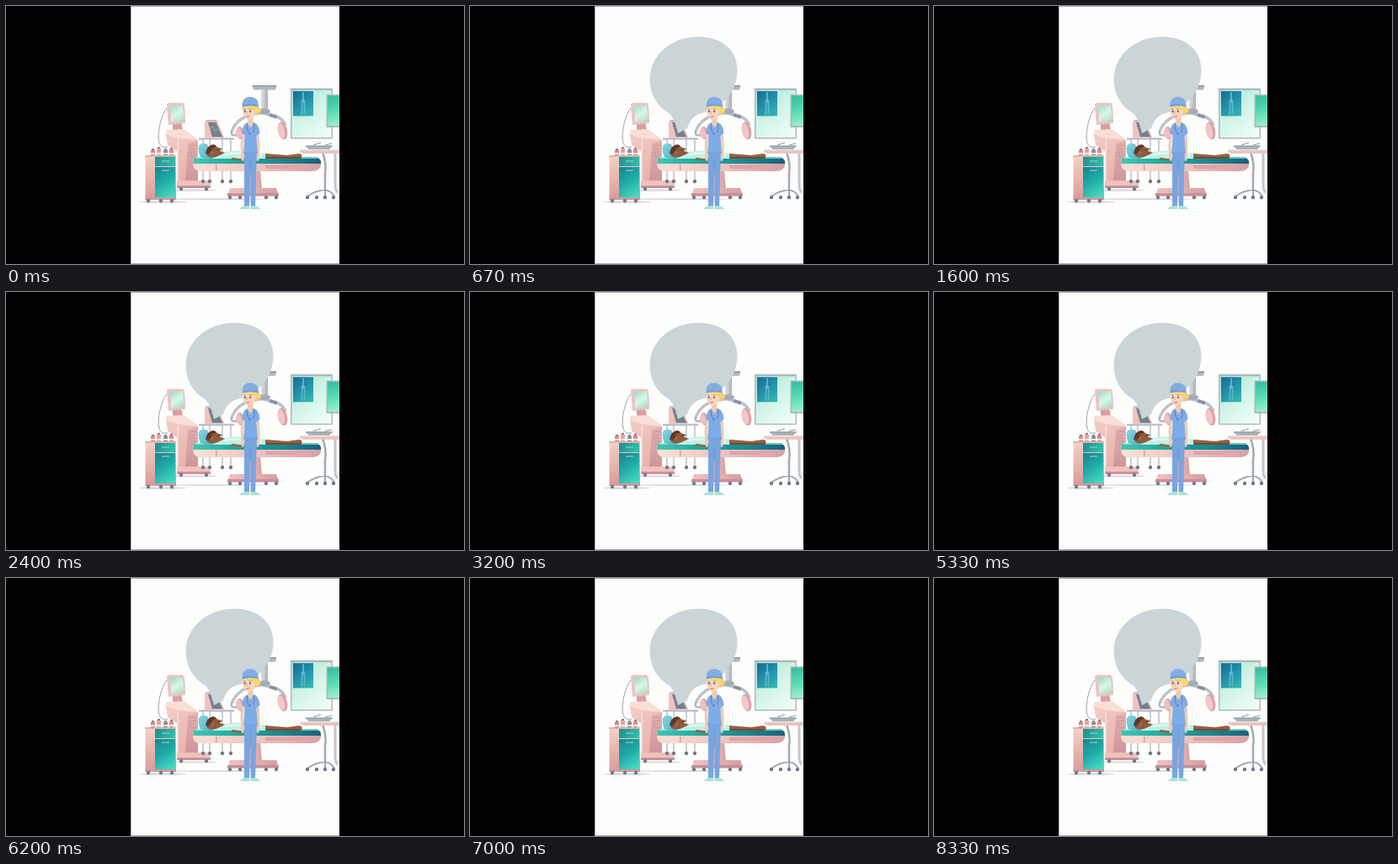
Write an HTML page with a canvas that moves like this. It is 544 by 306 pixels and loops after 8.39 s.

```html
<!DOCTYPE html>
<html lang="en">
<head>
<meta charset="utf-8">
<title>Operating room</title>
<style>
html, body { margin: 0; width: 100%; height: 100%; overflow: hidden; background: #000; }
canvas { display: block; width: 544px; height: 306px; }
</style>
</head>
<body>
<canvas id="stage" width="544" height="306"></canvas>
<script>
const ctx = document.getElementById("stage").getContext("2d");
const LOOP = 8390;
const STEP = 66.6;
const PINK = "#f0c2bc", ROSE = "#d9a0a2", BLUSH = "#f8ded6";
const GREY = "#b0b7bf", DARK = "#717b87", SKIN = "#f3c9ae", BLUE = "#80ace5";

function rect(x, y, w, h, fill) {
  ctx.fillStyle = fill;
  ctx.fillRect(x, y, w, h);
}
function shape(d, fill) {
  ctx.fillStyle = fill;
  ctx.fill(new Path2D(d));
}
function line(d, color, width = 1) {
  ctx.strokeStyle = color;
  ctx.lineWidth = width;
  ctx.stroke(new Path2D(d));
}
function oval(x, y, rx, ry, fill, angle = 0) {
  ctx.fillStyle = fill;
  ctx.beginPath();
  ctx.ellipse(x, y, rx, ry, angle, 0, Math.PI * 2);
  ctx.fill();
}
function blend(x0, y0, x1, y1, ...colors) {
  const g = ctx.createLinearGradient(x0, y0, x1, y1);
  colors.forEach((c, i) => g.addColorStop(i / (colors.length - 1), c));
  return g;
}
function wheels(y, ...xs) {
  for (const x of xs) oval(x, y, 2.2, 2.3, DARK);
}

function drawLamp() {
  shape("M292.5 94H321.5L320 99.5H294Z", GREY);
  rect(293, 94, 28, 1.4, "#8e969f");
  rect(303, 99, 8, 24, blend(303, 0, 311, 0, "#dde1e5", "#a9b0b9"));
  line("M303 127C290 128 274 132 268 149", "#bcc3ca", 3.5);
  line("M303 126L321 131Q329 134 332 142", "#bcc3ca", 4);
  line("M313 129L322 132", "#8992a0", 3.5);
  line("M268 148C267 153 269 154 274 153", GREY, 2.5);
  oval(307, 125, 7, 3.5, "#a4acb6");
  oval(278, 150.5, 4.5, 7.5, ROSE, -.15);
  oval(276.5, 150.5, 3.4, 6.5, PINK, -.15);
  oval(328.5, 148, 5.5, 10.5, ROSE, -.22);
  oval(327, 148.2, 4, 9, "#f3c8c4", -.22);
}

function drawBoard() {
  rect(338, 97.5, 50, 60, "#aebabf");
  rect(339.5, 100, 47, 56, blend(340, 100, 386, 156, "#a6e3d8", "#d3f5e8", "#f4fef7"));
  rect(341, 101, 24, 29.5, blend(341, 101, 365, 130, "#166b98", "#2590ab", "#37b8b4"));
  line("M353 102V112M352 115L351 129M355 115L354.5 129", "#55b4bf", 2);
  oval(353, 113, 2.6, 2, "#62bec5");
  rect(380.5, 105, 15.5, 39, "#aab9be");
  rect(382, 106.5, 14, 35.5, blend(382, 106, 396, 142, "#34b99f", "#58dab3", "#a5f2d3"));
}

function drawMachine() {
  oval(224, 218.5, 27, 1.3, "#dedee3");
  line("M191 121C184 130 179 151 182 162C184 168 188 168 192 167", "#929ba7", .9);
  shape("M198 137H208L211 151H198Z", ROSE);
  shape("M191 117Q191 115 194 115H210Q213 116 213 139L193 141Z", PINK);
  shape("M195 118H209.5Q211.5 127 211.5 136L196 138Z",
    blend(196, 118, 210, 138, "#9ddccb", "#d9f6e5", "#9fddca"));
  shape("M190 147L211 146L228 158L226 164L205 159L190 154Z", BLUSH);
  shape("M190 152L204 157L228 159V208H204V173L192 165Z",
    blend(195, 155, 224, 208, "#f2cac2", "#e5aeac"));
  shape("M216 163L228 160V208H213Z", blend(0, 160, 0, 208, "#e4b0ae", "#cf949b"));
  line("M204 158V208", "#f9ded9", 1.5);
  for (let y = 166; y < 181; y += 4) line(`M218 ${y}L225 ${y - 1}`, "#c58f97", .8);
  shape("M203 207H240Q243 209 243 216H203Z", PINK);
  rect(203, 213, 40, 3, "#c9929b");
  wheels(217, 208, 238);
}

function drawMonitorTable() {
  line("M234 158V208M242 158V207M257 158V207M267 158V208M234 194H267", "#aab2bb", 1.2);
  rect(229, 156.5, 42, 2, GREY);
  wheels(208, 234, 242, 257, 267);
  shape("M237 136Q237 135 239 135H250L259 156H236Z", "#d8b2b5");
  shape("M236 137L240 136L245 157H236Z", PINK);
  shape("M240 138H249L257 155H245Z", "#74808f");
  line("M243 145L246 143L248 148L252 146", "#a9c0c5", .8);
}

function drawBed() {
  oval(250, 229, 58, 1, "#dcdde2");
  shape("M290 194H302L304 217H288Z", blend(288, 0, 304, 0, PINK, ROSE));
  shape("M266 216H321L324 225H263Z", blend(263, 0, 324, 0, "#efc4be", "#d59ea2"));
  rect(263, 222, 61, 3.5, "#c88f99");
  wheels(227, 266, 278, 309, 321);
  shape("M222 187H374V190Q371 196 363 196H229Q222 194 222 187Z",
    blend(222, 0, 374, 0, "#f8e1d8", "#efc5bf", "#d8a0a5"));
  rect(249, 188, 1.5, 7, ROSE);
  rect(308, 189, 46, 4, "#dba5a9");
  shape("M223 180H370Q375 182 374 187H223Z",
    blend(223, 0, 374, 0, "#46c4b1", "#1fa79e", "#188c92", "#1d5f7c"));
  rect(225, 179, 145, 2, blend(225, 0, 370, 0, "#9ae4d2", "#69cbbf"));
}

function drawPatient() {
  shape("M229 166Q232 161 239 164L248 179Q241 184 231 179Q228 174 229 166Z",
    blend(229, 163, 245, 181, "#83d5df", "#4db8c6"));
  shape("M257 174Q271 170 288 173L309 175V181H245Q249 178 257 174Z", "#c0f1e6");
  line("M259 176Q276 173 303 177", "#e4faf2", 2);
  shape("M308 175L334 177L348 175Q353 175 351 181H308Z", "#946144");
  rect(309, 179, 41, 1.7, "#70472f");
  line("M268 181L281 183", "#946144", 2.5);
  shape("M238 174Q240 166 248 165L252 168L257 169L254 172L260 174L254 177Q245 182 239 178Z", "#8f5a3d");
  shape("M237 175Q238 166 246 164L250 166L245 169L243 173L240 176Z", "#5d3a28");
  oval(245, 174, 1.4, 1.9, "#a56d4c");
  line("M251 171L253 170", "#38271f", .8);
}

function drawRightTable() {
  line("M391 174V211Q391 219 394 221", "#c7c5cb", 3);
  line("M376 174Q381 186 379 199V219", "#a4acb6", 2.6);
  line("M379 218Q367 219 358 226M379 218Q386 219 390 226M379 217V226", "#9fa8b3", 2.2);
  shape("M349 171H396V175H354Q349 174 349 171Z", PINK);
  rect(349, 170.5, 47, 1.2, "#d8d6da");
  shape("M355 166H388L384 170H360Z", "#a7b3bb");
  line("M356 166H388M365 165L374 162M379 165L387 163", "#7d8c98", .9);
  wheels(227, 358, 369, 379, 389);
}

function drawCart() {
  oval(186, 232.5, 29, 1.5, "#dcdce2");
  for (const [x, h, c] of [[172, 7, "#c9878d"], [179, 9, "#e4a3a1"], [187, 7, "#8a909b"], [194, 8, "#d78f8c"]]) {
    rect(x, 178 - h, 5, h, c);
    rect(x + 1, 176 - h, 3, 2, "#9a838a");
    rect(x, 174, 5, 2, "#f4ded9");
  }
  rect(165.5, 178, 36.5, 51, blend(165, 178, 177, 229, "#f5d2c8", "#eab5ae", "#d8989a"));
  rect(165, 177, 37, 2, "#e5b0ac");
  rect(177, 179, 24, 11, blend(177, 179, 201, 190, "#1b8f90", "#3ac0aa"));
  rect(177, 191, 24, 36, blend(177, 191, 201, 227, "#16838f", "#23aeaa", "#52dfc1"));
  line("M185 184H194M185 195H194", "#8edfce", 1);
  rect(165.5, 227, 36.5, 3, "#d19a9d");
  wheels(231, 169, 184, 197);
}

function drawBubble(opacity) {
  ctx.globalAlpha = opacity;
  shape("M213.5 87C213.5 60 237 36.5 272 36.5C300 36.5 317.5 53 317.5 76C317.5 101 300 121 275 127C265 130 261 136 258 145L247 151C245 142 242 132 236 127C222 119 213.5 104 213.5 87Z", "#cbd5d8");
  ctx.globalAlpha = 1;
}

function drawBody(sway) {
  line(`M282 149L${280 + sway} 165L281 181`, SKIN, 3);
  line(`M299 149L${300 + sway} 165L299 181`, SKIN, 3);
  oval(281, 181, 1.6, 3, SKIN);
  oval(299, 181, 1.6, 3, SKIN);
  shape("M283 172H298L296 238H290.7L290.3 190L289 238H283Z", "#79a5df");
  line("M290.2 181V200", "#638fca", .6);
  shape("M283 237H289V241H278Q278 238 283 237Z", "#a8e5d7");
  shape("M290.5 237H297Q302 239 302 241H290.5Z", "#a8e5d7");
  shape("M287 138Q281 140 280 151L283.5 153L282 175H299L297.5 154L301.5 151Q301 140 294 138Z", BLUE);
  shape("M287.5 131H293.5V139L290.5 145L287 139Z", SKIN);
  line("M286.5 140Q286 148 289 151M294.5 139Q296 147 293 150", "#5576a6", .8);
  oval(289.5, 151.5, 1, 1, "#4b6891");
  line("M283 174H298", "#6c98d3", .8);
}

function drawHead(t, sway) {
  ctx.save();
  ctx.translate(sway, sway * .3);
  shape("M284 119H299Q304 121 302 126Q299 130 294 130Z", "#efc85f");
  shape("M280.5 118Q286 116 298 119L296 128Q293 135 287 135Q281 132 280.5 123Z", "#f7d6bd");
  shape("M283 119Q293 116 303 122Q302 128 297 126Q294 122 283 120Z", "#f5d672");
  oval(296.5, 127, 1.4, 2, SKIN);
  shape("M280.5 119Q280 108 290 107.7Q300 108 300 119Q290 117 280.5 120Z", "#82ade3");
  line("M281 118.5Q290 115.8 300 119", "#6a97d3", 1.3);
  const blink = [1900, 3750, 5500, 7550].some(start => t >= start && t < start + 135);
  for (const x of [283.8, 290]) {
    if (blink) line(`M${x - 1} 125H${x + 1}`, "#956b53", .8);
    else oval(x, 125, 1, 1.3, "#56606c");
  }
  const brow = t > 2600 && t < 3500 || t > 6400 ? .6 : 0;
  line(`M282 122.5L285 ${122.5 + brow}M288.5 ${122.5 + brow}L291.5 122`, "#a6764f", .8);
  line("M286.5 125L285.8 128H287", "#dda17e", .7);
  line("M285 131Q287 132 289.5 130.5", "#bd6764", .9);
  ctx.restore();
}

function draw(t) {
  rect(0, 0, 544, 306, "#000");
  rect(148, 0, 248, 306, "#b4b4b4");
  rect(149, 1, 247, 304, "#fdfefc");
  drawBoard();
  drawLamp();
  drawMachine();
  drawMonitorTable();
  drawBed();
  drawPatient();
  drawRightTable();
  drawCart();
  const u = Math.max(0, Math.min(1, (t - 40) / 340));
  drawBubble(u * u * (3 - 2 * u));
  const sway = .25 * Math.sin(t / LOOP * Math.PI * 8);
  drawBody(sway);
  drawHead(t, sway);
}

function tick() {
  const time = performance.now() % LOOP;
  draw(Math.floor(time / STEP) * STEP);
  requestAnimationFrame(tick);
}
tick();
</script>
</body>
</html>
```
